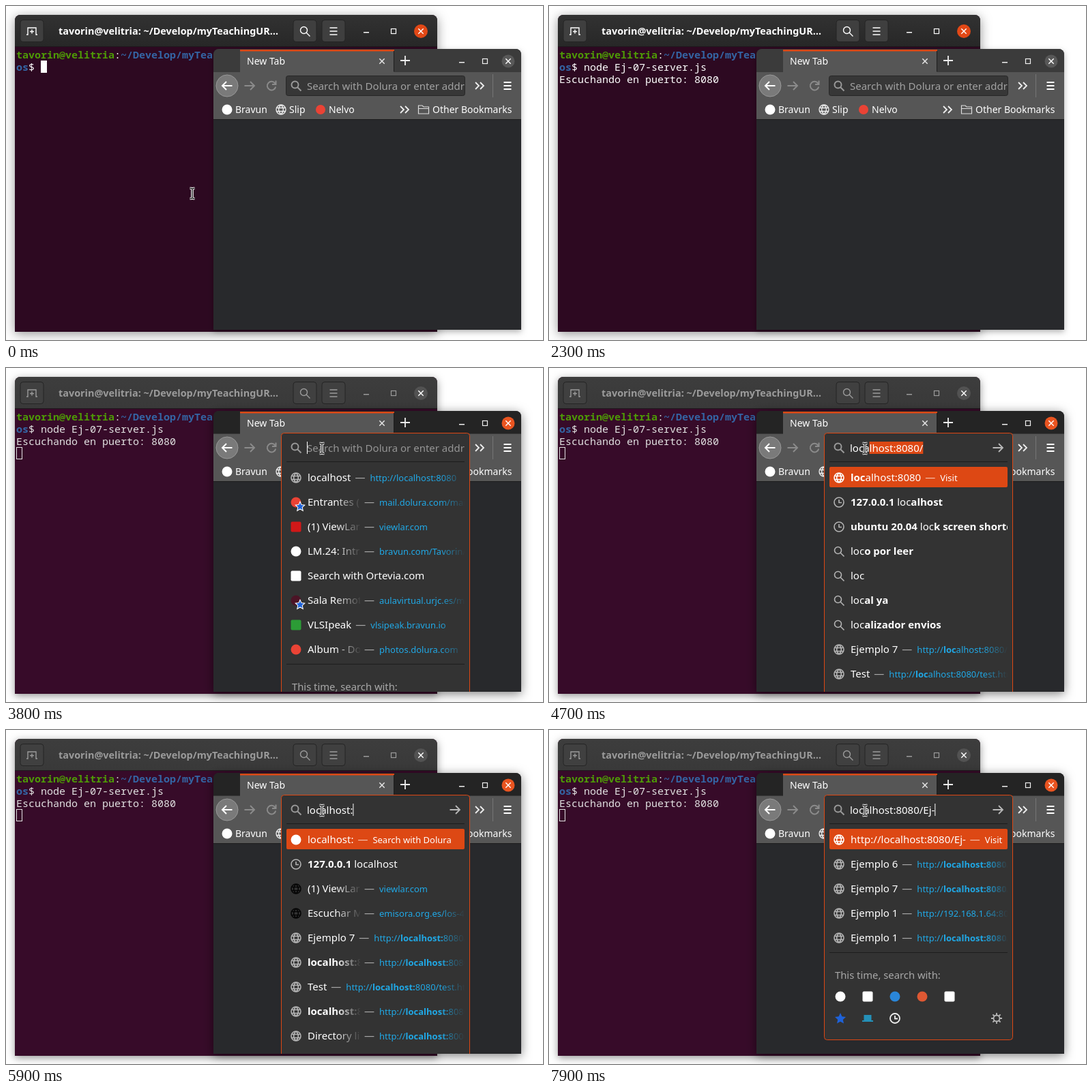
Animation, 787 px wide and 490 px high, one loop 8000 ms. Source, as an HTML page with a canvas:

```html
<!DOCTYPE html>
<html lang="en">
<head>
<meta charset="utf-8">
<title>Starting a local server and opening it</title>
<style>
  html, body { margin: 0; width: 100%; height: 100%; overflow: hidden; background: #fff; }
  canvas { display: block; }
</style>
</head>
<body>
<canvas id="stage" width="787" height="490"></canvas>
<script>
const ctx = document.getElementById('stage').getContext('2d');
const LOOP = 8000;
const ORANGE = '#dd4814', LINK = '#1fa8e6';
const SANS = '"Noto Sans", sans-serif', MONO = '"Noto Sans Mono", monospace';

const ring = r => `M${r} 0a${r} ${r} 0 1 1-${2 * r} 0a${r} ${r} 0 1 1 ${2 * r} 0`;
const SHAPES = {
  lens: 'M3.5-1.5a5 5 0 1 1-10 0a5 5 0 1 1 10 0M2 2L7.5 7.5',
  globe: ring(7) + 'M-6.5-2.5H6.5M-6.5 2.5H6.5M0-7C-4.5-3-4.5 3 0 7C4.5 3 4.5-3 0-7',
  clock: ring(7) + 'M0-4V0.5H4',
  gear: ring(4.5) + 'M0-5V-8M0 5V8M-5 0H-8M5 0H8M3.5-3.5L5.6-5.6M-3.5 3.5L-5.6 5.6M3.5 3.5L5.6 5.6M-3.5-3.5L-5.6-5.6',
  star: 'M0-8L2.4-2.7L8-2L3.8 1.9L5 7.6L0 4.7L-5 7.6L-3.8 1.9L-8-2L-2.4-2.7Z',
  tabs: 'M-5.5 3V-5H5.5V3H8V5H-8V3Z',
  right: 'M-7.5 0H7M1-6L7 0L1 6',
  left: 'M7.5 0H-7M-1-6L-7 0L-1 6',
  reload: 'M5.5-3.2A6.3 6.3 0 1 0 6.3 1.5M6.5-7.5V-2H1',
  close: 'M-3.7-3.7L3.7 3.7M3.7-3.7L-3.7 3.7',
  plus: 'M-7 0H7M0-7V7',
  menu: 'M-5.5-5H5.5M-5.5 0H5.5M-5.5 5H5.5',
  more: 'M-6-5L-1 0L-6 5M1-5L6 0L1 5',
  folder: 'M-7.5-6H-2L0-4H7.5V6H-7.5ZM-7.5-1.5H7.5',
  newTab: 'M-8 5H-6V-5H6V5H8M0-2.5V3.5M-3 .5H3',
  beam: 'M-3.5-7.5H-1.5L0-6.5L1.5-7.5H3.5M0-6.5V6.5M-3.5 7.5H-1.5L0 6.5L1.5 7.5H3.5',
  arrow: 'M0 0V16L4 12.5L6.5 18L9 17L6.5 11.5H11.5Z'
};

function shape(name, x, y, color, width, scale = 1) {
  const path = new Path2D(SHAPES[name]);
  ctx.save();
  ctx.translate(x, y);
  ctx.scale(scale, scale);
  ctx.fillStyle = ctx.strokeStyle = color;
  if (width) { ctx.lineWidth = width; ctx.stroke(path); } else ctx.fill(path);
  ctx.restore();
}

function box(x, y, w, h, fill, radius = 0, border) {
  ctx.beginPath();
  ctx.roundRect(x, y, w, h, radius);
  ctx.fillStyle = fill;
  ctx.fill();
  if (border) { ctx.strokeStyle = border; ctx.lineWidth = 1; ctx.stroke(); }
}

function disc(x, y, r, fill, border) {
  box(x - r, y - r, 2 * r, 2 * r, fill, r, border);
}

// Asterisks toggle bold; returns the width of the text.
function text(str, x, y, color = '#fff', size = 15, family = SANS) {
  const start = x;
  ctx.fillStyle = color;
  str.split('*').forEach((part, i) => {
    ctx.font = `${i % 2 ? 'bold ' : ''}${size}px ${family}`;
    ctx.fillText(part, x, y);
    x += ctx.measureText(part).width;
  });
  return x - start;
}

function widthOf(str, size = 15) {
  ctx.font = `${size}px ${SANS}`;
  return ctx.measureText(str).width;
}

function fade(color, from, to) {
  const gradient = ctx.createLinearGradient(from, 0, to, 0);
  gradient.addColorStop(0, color);
  gradient.addColorStop(1, color + '00');
  return gradient;
}

function clipped(x, y, w, h, draw) {
  ctx.save();
  ctx.beginPath();
  ctx.rect(x, y, w, h);
  ctx.clip();
  draw();
  ctx.restore();
}

function shadowBox(x, y, w, h, fill, blur, alpha) {
  ctx.save();
  ctx.shadowColor = `rgba(0,0,0,${alpha})`;
  ctx.shadowBlur = blur;
  ctx.shadowOffsetY = 3;
  box(x, y, w, h, fill, [8, 8, 0, 0]);
  ctx.restore();
}

const clamp = v => Math.max(0, Math.min(1, v));
const smooth = v => v * v * (3 - 2 * v);
const mixer = p => (a, b) => `rgb(${a.map((v, i) => Math.round(v + (b[i] - v) * p))})`;
const grey = v => [v, v, v];

function windowButtons(x, y, gap, r, closeFill, ink, closeInk) {
  box(x - 2 * gap - 4, y + 1, 8, 1.5, ink);
  ctx.strokeStyle = ink;
  ctx.lineWidth = 1.2;
  ctx.strokeRect(x - gap - 3.5, y - 3.5, 7, 7);
  disc(x, y, r, closeFill);
  shape('close', x, y, closeInk, 1.4);
}

function drawTerminal(t, focus) {
  const mix = mixer(focus);
  const ink = mix(grey(255), grey(155));
  shadowBox(13, 13, 619, 465, mix([45, 9, 33], [55, 11, 41]), 16 - 4 * focus, .42);
  const header = ctx.createLinearGradient(0, 13, 0, 60);
  header.addColorStop(0, mix(grey(50), grey(61)));
  header.addColorStop(1, mix(grey(39), grey(57)));
  box(13, 13, 619, 47, header, [8, 8, 0, 0]);
  box(13, 59, 619, 1, '#1d1a1c');
  for (const [x, icon] of [[38, 'newTab'], [438, 'lens'], [480, 'menu']]) {
    box(x - 17, 20.5, 34, 32, mix(grey(63), grey(64)), 4, '#242424');
    shape(icon, x, 37, ink, 1.4);
  }
  const title = '*tavorin@velitria: ~/Develop/myTeachingUR…*';
  ctx.textAlign = 'center';
  text(title, 238, 42, ink, 14.4);
  ctx.textAlign = 'left';
  windowButtons(608, 37, 40, 10, mix([226, 72, 22], grey(82)), ink, '#fff');

  const output = mix(grey(255), grey(225));
  const green = '#4e9a06', blue = '#3465a4';
  const mono = (str, col, line, color) =>
    text(str, 15 + 9 * col, 77 + 18 * line, color, 15, MONO);
  mono('*tavorin@velitria*', 0, 0, green);
  mono(':', 16, 0, output);
  mono('*~/Develop/myTeac*', 17, 0, blue);
  mono('*os*', 0, 1, blue);
  mono('$', 2, 1, output);
  if (t >= 700) mono('node Ej-07-server.js', 4, 1, output);
  if (t >= 2000) mono('Escuchando en puerto: 8080', 0, 2, output);

  const blinkedOff = [[500, 700], [1300, 1700], [2300, 2600]].some(([a, b]) => t >= a && t < b);
  if (t >= 3400) {
    ctx.strokeStyle = output;
    ctx.lineWidth = 1;
    ctx.strokeRect(15.5, 116.5, 8, 17);
  } else if (!blinkedOff) {
    const [x, y] = t < 700 ? [51, 80] : t < 2000 ? [240, 80] : [15, 116];
    box(x, y, 9, 18, '#fff');
  }
}

const PLACEHOLDER = 'Search with Dolura or enter address';

function drawBrowser(t, focus) {
  const mix = mixer(focus);
  shadowBox(304, 63, 451, 412, '#28292c', 9 + 6 * focus, .3 + .2 * focus);
  box(304, 63, 451, 34, mix(grey(59), grey(36)), [8, 8, 0, 0]);
  box(343, 64, 226, 33, '#565656');
  box(343, 64, 226, 2.5, ORANGE);
  box(568, 66, 1, 30, '#1e1e1e');
  box(304, 96, 451, 1, '#3a3a3a');
  box(304, 97, 451, 69, '#565656');
  box(343, 95, 225, 3, '#565656');
  box(304, 166, 451, 1, '#1c1c1d');
  text('New Tab', 353, 86, '#fff', 14);
  shape('close', 551, 81, '#e4e4e4', 1.5);
  shape('plus', 585, 80, '#eee', 1.8);
  windowButtons(736, 81, 34, 9.5, mix(grey(88), [233, 84, 32]), '#f0f0f0', '#fff');

  disc(324, 117, 16, '#7a7a7a', '#989898');
  shape('left', 324, 117, '#fff', 2);
  shape('right', 357, 117, '#8b8b8b', 2);
  shape('reload', 389, 117, '#8b8b8b', 2);
  const hovered = t >= 3100;
  box(410.5, 102.5, 262, 29, '#373737', 3, hovered ? '#777' : '#272727');
  shape('lens', 425, 117, '#999', 2);
  clipped(440, 103, 232, 28, () => text(PLACEHOLDER, 441, 123, '#a2a2a2'));
  shape('more', 694, 117, '#eee', 1.8);
  box(713, 100, 1, 34, '#757575');
  shape('menu', 735, 117, '#fff', 2);

  disc(324, 152, 7.5, '#fff');
  text('Bravun', 336, 157, '#fff', 14);
  shape('globe', 403, 152, '#eee', 1.3);
  text('Slip', 415, 157, '#fff', 14);
  disc(461, 152, 7, '#ea4335');
  text('Nelvo', 473, 157, '#fff', 14);
  shape('more', 584, 152, '#eee', 1.8);
  shape('folder', 612, 152, '#ddd', 1.2);
  text('Other Bookmarks', 625, 157, '#fff', 14);
}

// Rows: icon | title | address. "#" icons are discs, "s#" squares, "+" adds a star badge.
const HOME = 'http://localhost:8080/';
const RECENT = [
  'globe|localhost|http://localhost:8080',
  '#ea4335+|Entrantes (12)|mail.dolura.com/mail',
  's#d01818|(1) ViewLarix|viewlar.com',
  '#ffffff|LM.24: Introduce|bravun.com/Tavorin/wiki',
  's#ffffff|Search with Ortevia.com',
  '#4c1426+|Sala Remota Uno|aulavirtual.urjc.es/moodle',
  's#2c9c36|VLSIpeak|vlsipeak.bravun.io',
  '#ea4335|Album - Dolura|photos.dolura.com'
];
const SUGGESTED = [
  'clock|127.0.0.1 localhost', 'clock|ubuntu 20.04 lock screen shortcuts',
  'lens|loco por leer', 'lens|loc', 'lens|local ya', 'lens|localizador envios',
  `globe|Ejemplo 7|${HOME}`, `globe|Test|${HOME}test.html`, `globe|Error|${HOME}hola`
];
const HOST = [
  'clock|127.0.0.1 localhost', 'dark|(1) ViewLarix|viewlar.com',
  'dark|Escuchar Marea|emisora.org.es/los-40', `globe|Ejemplo 7|${HOME}Ej-07`,
  `globe|localhost:8080/|${HOME}Ej-07`, `globe|Test|${HOME}test.html`,
  `globe|localhost:8080/|${HOME}Ej-06`, 'globe|Directory listing|http://localhost:8000/',
  `globe|Error|${HOME}hola`
];
const PORT = [
  `globe|localhost:8080/|${HOME}Ej-07`, `globe|Test|${HOME}test.html`,
  `globe|localhost:8080/|${HOME}Ej-06`, `globe|Ejemplo 6|${HOME}Ej-06`,
  `globe|WebSockets|${HOME}ws`, 'globe|127.0.0.1:8080|http://127.0.0.1:8080/',
  `globe|Ejemplo 7|${HOME}Ej-07`, `globe|Error|${HOME}hola`, `globe|Ejemplo 1|${HOME}Ej-01`
];
const EXAMPLES = [
  `globe|Ejemplo 6|${HOME}Ej-06`, `globe|Ejemplo 7|${HOME}Ej-07`,
  'globe|Ejemplo 1|http://192.168.1.64:8080/', `globe|Ejemplo 1|${HOME}Ej-01`
];

const ADDRESS = 'localhost:8080/Ej-';
const KEY_TIMES = [4300, 4400, 4500, 4700, 4900, 5000, 5200, 5300, 5400, 5800,
  6000, 6200, 6500, 6700, 7000, 7400, 7500, 7800];
const LIST_DELAY = 100;
const keysBy = t => KEY_TIMES.filter(time => t >= time).length;

const embolden = (str, query) => str.split(query).join(`*${query}*`);

// Pages show the match in bold, search suggestions show the rest in bold.
function mark(row, query) {
  const [icon, title, url] = row.split('|');
  const hit = query.replace(/:$/, '');
  return url ? [icon, embolden(title, query), embolden(url, query)]
    : [icon, `*${embolden(title, hit)}*`];
}

function rowsFor(count) {
  if (!count) return RECENT.map(row => row.split('|'));
  const typed = ADDRESS.slice(0, count === 14 ? 13 : count);
  const marked = (rows, query = typed) => rows.map(row => mark(row, query));
  if (count < 10) {
    const first = ['globe', embolden('localhost:8080', typed), 'Visit'];
    return [first, ...marked(count < 6 ? SUGGESTED : HOST)];
  }
  if (count === 10) return [['#ffffff', typed, 'Search with Dolura'], ...marked(HOST)];
  const first = ['globe', count === 15 ? typed : `http://${typed}${count < 15 ? '/' : ''}`, 'Visit'];
  if (count < 16) return [first, ...marked(PORT)];
  const base = 'localhost:8080/';
  const stale = count < 18 ? marked(PORT.slice(4), base) : [];
  return [first, ...marked(EXAMPLES, base), ...stale];
}

function drawIcon(icon, x, y, color) {
  const hex = icon.match(/#\w+/);
  if (!hex) shape(icon === 'dark' ? 'globe' : icon, x, y, icon === 'dark' ? '#050505' : color, 1.6);
  else if (icon[0] === 's') box(x - 7.5, y - 7.5, 15, 15, hex[0], 2);
  else disc(x, y, 7.5, hex[0]);
  if (icon.endsWith('+')) {
    shape('star', x + 6, y + 6, '#fff', 3, .7);
    shape('star', x + 6, y + 6, '#1f62d8', 0, .7);
  }
}

function drawRow([icon, title, url], y, selected) {
  if (selected) box(411, y - 16, 261, 30, ORANGE, 2);
  drawIcon(icon, 425, y, selected ? '#fff' : '#b4b4b4');
  const long = url && !selected && widthOf(title.replaceAll('*', '')) > 76;
  let end = 519;
  if (long) clipped(442, y - 15, 77, 30, () => text(title, 442, y + 5, fade('#ffffff', 482, 521)));
  else end = 442 + text(title, 442, y + 5);
  if (!url) return;
  text('—', end + 6, y + 5, selected ? '#f4c4b0' : '#aaa');
  text(url, end + 28, y + 5, selected ? '#fff' : fade(LINK, 636, 673), 13);
}

function drawEngines(y) {
  box(411, y, 261, 1, '#1d1d1d');
  text('This time, search with:', 419, y + 39, '#a8a8a8', 14.8);
  ['#ffffff', 's#ffffff', '#2a86d8', '#de5833', 's#ffffff']
    .forEach((icon, i) => drawIcon(icon, 427 + 40 * i, y + 65));
  shape('star', 427, y + 97, '#1f62d8');
  shape('tabs', 467, y + 97, '#2490b8');
  shape('clock', 507, y + 97, '#eee', 1.8);
  shape('gear', 656, y + 97, '#b8b8b8', 1.8);
}

function drawField(count) {
  shape('lens', 425, 117, '#999', 2);
  let caret = 441;
  if (!count) {
    text(PLACEHOLDER, 441, 123, '#959595');
  } else {
    const typed = ADDRESS.slice(0, count);
    const completed = count < 15 && count !== 10 ? ADDRESS.slice(count, 15) : '';
    caret += widthOf(typed);
    if (completed) box(caret, 108, widthOf(completed), 18, ORANGE);
    text(typed + completed, 441, 123);
    box(650, 104, 22, 26, '#333');
    shape('right', 658, 117, '#b8b8b8', 1.8);
    if (completed) return;
  }
  box(caret, 108, 1, 18, '#fff');
}

function drawPopup(t) {
  const listed = keysBy(t - LIST_DELAY);
  const rows = t < 3600 ? [] : rowsFor(listed);
  const divider = 146 + 36 * rows.length;
  const height = rows.length ? divider + 128 - 95 : 42;
  clipped(304, 64, 451, 411, () => {
    box(403.5, 95.5, 276, height, '#333', 4, ORANGE);
    clipped(404, 96, 268, height - 1, () => {
      drawField(keysBy(t));
      if (!rows.length) return;
      box(411, 137, 261, 1, '#1d1d1d');
      rows.forEach((row, i) => drawRow(row, 161 + 36 * i, listed > 0 && i === 0));
      drawEngines(divider);
    });
  });
}

function drawPointer(t) {
  if (t >= 400 && t < 2600) return;
  const moved = t < 400 ? 0 : smooth(clamp((t - 2500) / 700));
  const x = 273 + 190 * moved, y = 275 - 157 * moved;
  if (x > 304 && y > 131) {
    shape('arrow', x, y, '#fff', 2.5);
    shape('arrow', x, y, '#111');
  } else {
    shape('beam', x, y, '#fff', 3.6);
    shape('beam', x, y, '#111', 1.3);
  }
}

function draw(t) {
  const focus = clamp((t - 3300) / 300);
  box(0, 0, 787, 490, '#fff');
  drawTerminal(t, focus);
  drawBrowser(t, focus);
  if (t >= 3500) drawPopup(t);
  drawPointer(t);
}

function tick() {
  draw(performance.now() % LOOP);
  requestAnimationFrame(tick);
}
tick();
</script>
</body>
</html>
```
